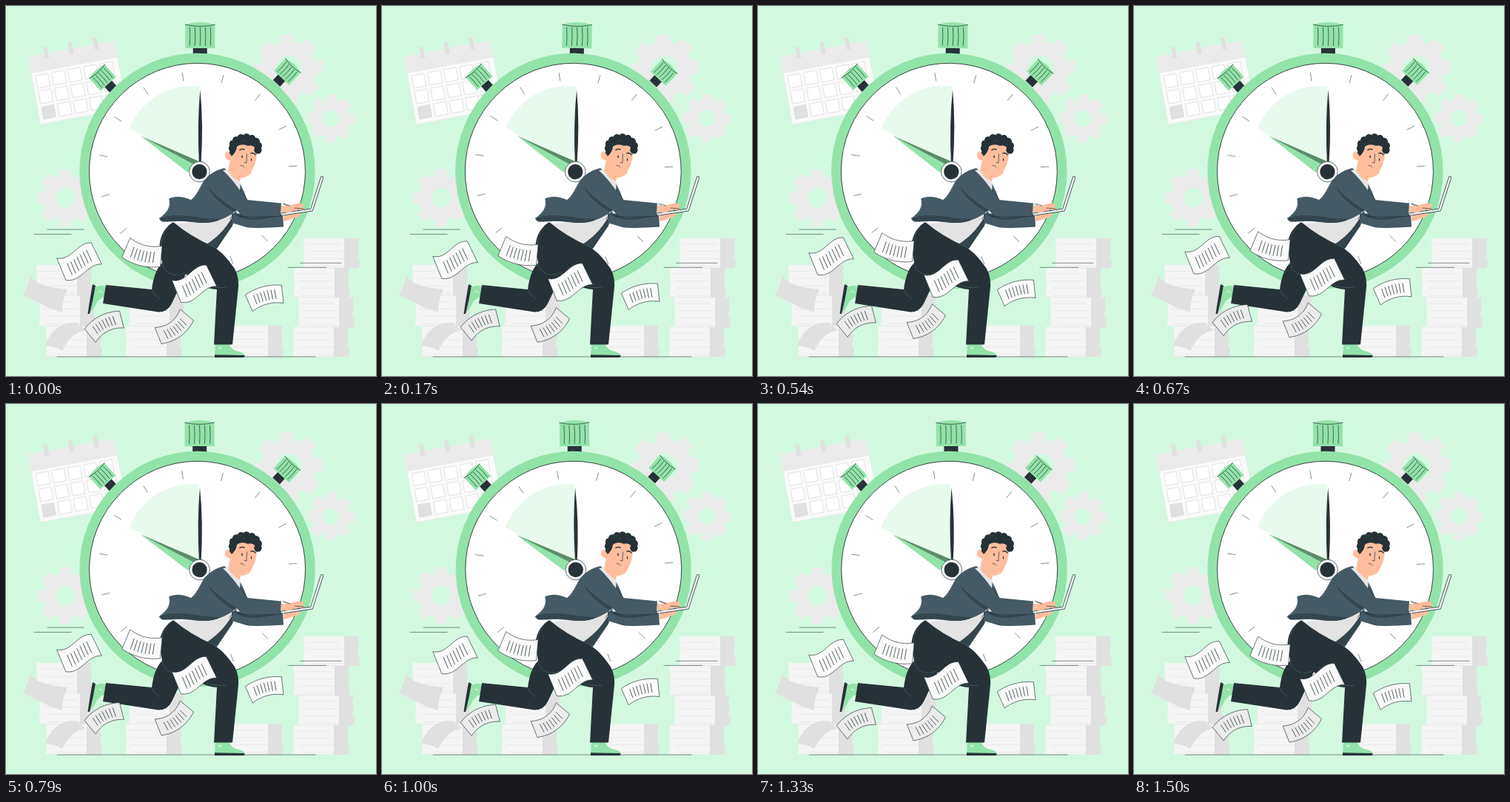
An HTML page for the animation above (1540 ms loop, 500x500 px).

```html
<!DOCTYPE html>
<html lang="en">
<head>
<meta charset="utf-8">
<title>Running against the clock</title>
<style>
html, body { margin: 0; height: 100%; overflow: hidden; background: #d2f9e0; }
svg { display: block; width: 100vw; height: 100vh; }
.ink { fill: #263238; }
.green { fill: #92e3a9; }
.suit { fill: #455a64; }
.fold { fill: #34454e; }
.skin { fill: #ffbe9d; }
.line { fill: none; stroke: #263238; stroke-width: .7; stroke-linecap: round; stroke-linejoin: round; }
.thin { stroke-width: .55; }
.seam { fill: none; stroke: #53656e; stroke-width: .6; }
.sheet { stroke: #263238; stroke-width: .6; stroke-linejoin: round; }
.laptop { fill: none; stroke-linecap: round; stroke-linejoin: round; }
</style>
</head>
<body>
<svg viewBox="0 0 500 500">
  <g id="calendar" transform="translate(29.6 68.6) rotate(-10.5)"></g>
  <g id="gears" fill="#ebebeb" fill-rule="evenodd"></g>
  <g id="stacks"></g>
  <path fill="#e0e0e0" d="M33 365C44 379 64 381 83 383Q76 396 76 414C58 409 44 400 23 391Q29 379 33 365Z
    M53 459C57 444 73 426 95 428L108 438C92 441 83 452 76 466Q66 459 53 459Z"/>

  <g id="watch">
    <g id="buttons"></g>
    <circle class="green" cx="258.5" cy="223" r="159.2"/>
    <circle cx="258.5" cy="223.3" r="146" fill="#fff" stroke="#263238" stroke-width=".9"/>
    <g id="ticks" class="line thin"></g>
    <path fill="#e8f9ed" d="M261 224L166.700 165C183 129 217 105 261 108Z"/>
    <path class="green" d="M182 176L256 214L246 225Z"/>
    <path fill="#5b8d6b" d="M182 176L261 210L256 215Z"/>
    <path class="ink" d="M262.2 113Q267 160 263.5 213H261Q258 160 262.2 113Z"/>
    <circle cx="261.5" cy="224" r="13.8" fill="#fff" stroke="#263238" stroke-width=".7"/>
    <circle class="ink" cx="261.5" cy="224" r="10.2"/>
  </g>

  <path class="line thin" d="M69 474H418M56 302H105M38 308.4H88M398 347.3H453M381 353.3H433"/>

  <g id="man">
    <path class="green" d="M121 380Q127 376 135 379L134 392Q124 396 120 406L113 415Z
      M283 457H302Q304 465 315 467Q322 469 323 473H282Z"/>
    <path class="ink" d="M117 376L121 378Q118 396 113 416H110.5Q113 398 117 376ZM282 471.2L322 472Q324 475 319 475H282Z"/>
    <path class="line" style="stroke:#fff" d="M127 385l2 2m0-2l-2 2M288 461l3 2m0-2l-3 2"/>
    <path fill="#e3e3e3" d="M226 294L270 292L311 278L298 302L272 323L245 308Z"/>
    <path class="ink" d="M226 292C214 299 206 314 208 329L211 347Q200 358 197 383L135 377L131 402L206 413.5Q218 414 224 402L243 362Q264 382 285 383L281 457.5H306L313.500 385Q316 368 309 355C302 345 293 333 280 325Q250 312 226 292Z"/>
    <path class="seam" d="M219 300Q208 310 210 332M211 347C213 361 228 368 242 360M197 383Q199 391 209 396M271 377Q284 382 298 380"/>
    <path class="fold" d="M312 277L306 297L285 328L271 322Q296 306 309 279Z"/>
    <path class="suit" d="M305 280L374 282L375 298.500Q338 301 325 299L305 293Z"/>
    <path class="fold" d="M308 281L372 284L340 289Q320 290 308 281Z"/>
    <path class="suit" d="M295 219C281 222 269 231 264 242Q256 258 250 262C240 257 228 256 220 260.500C224 273 215 281 207 287Q208 292 216 291C235 288 252 294 274 293Q295 290 312 276Q319 285 330 286L371 284L372 266.500L326 262Q318 239 308 229Z"/>
    <path class="fold" d="M208 287C233 277 256 288 290 288Q277 295 256 292C237 288 220 293 210 291ZM273 245Q282 263 307 278L312 276Q286 260 273 245Z"/>
    <path class="line" d="M298 224C309 235 317 250 326 262M312 277L302 288M314 284Q334 286 371 284"/>
    <path fill="#e6e6e6" d="M299 221L309 229L317 237L316 249Q305 233 293 222Z"/>
    <path class="skin" d="M302 197C295 195 293 205 300 208L303 209L300 222Q306 233 316 237L317 232Q329 233 333 221Q340 209 339 190L312 184Z"/>
    <g id="hair" class="ink"></g>
    <path class="ink" d="M303 182H340L342 199Q336 186 327 189Q318 185 312 190Q311 198 305 203L302 199Z"/>
    <path class="line" style="stroke-width:1.4" d="M316 194.500Q318 192.500 322 194M331 199Q335 198 337 201M319 203v1M331.5 207.500v1"/>
    <path class="line" d="M325.5 200L325 212L322 211.500M317 215.500Q320 214.500 322 218M319 202v3M331.5 206v3"/>
    <path class="skin" d="M372 270Q382 271 388 268Q398 265 402 268Q405 271 398 273L390 277L372 279ZM375 284Q384 280 395 279L399 282Q391 288 375 291Z"/>
    <g class="laptop">
      <path id="laptop" stroke="#263238" stroke-width="4.1" d="M373 281.500L413 275.500L427 232"/>
      <path stroke="#e9eeec" stroke-width="2.7" d="M373 281.500L413 275.500L427 232"/>
    </g>
    <path class="skin" d="M373 271L386 269L396 272L403 273L402 275.500L390 275L385 279L373 279Z"/>
    <path class="line" d="M375 267L384 270M390 273L402 274"/>
  </g>
  <g id="papers"></g>
</svg>

<script>
const PERIOD = 1540, LEAD = 40, GROUND = 474;
const byId = id => document.getElementById(id);
const add = (id, markup) => byId(id).innerHTML += markup;
const rect = (x, y, w, h, fill, extra = '') =>
  `<rect x="${x}" y="${y}" width="${w}" height="${h}" fill="${fill}" ${extra}/>`;
const polar = (r, deg) => {
  const a = deg * Math.PI / 180;
  return [r * Math.sin(a), -r * Math.cos(a)];
};

function drawCalendar() {
  let out = rect(0, 0, 119, 93, '#fafafa', 'stroke="#e6e6e6" stroke-width=".6"') +
    rect(0, 0, 119, 23, '#ebebeb');
  for (let i = 0; i < 3; i++) out += rect(22.5 + i * 34, -9, 5.5, 16, '#e0e0e0');
  for (let row = 0; row < 3; row++)
    for (let col = 0; col < 5; col++)
      out += rect(5.5 + col * 22, 27 + row * 21.5, 17, 17,
        row === 2 && !col ? '#e0e0e0' : '#fff', 'stroke="#e0e0e0" stroke-width=".9"');
  add('calendar', out);
}

function gear(cx, cy, r, hole, turn) {
  const points = [];
  for (let a = turn; a < turn + 360; a += 45)
    points.push(polar(r * .78, a - 15), polar(r, a - 10), polar(r, a + 10), polar(r * .78, a + 15));
  const half = x => `A${hole} ${hole} 0 0 0 ${x} 0`;
  add('gears', `<path transform="translate(${cx} ${cy})" stroke="#ebebeb" stroke-width="2" stroke-linejoin="round"
    d="M${points.join('L')}ZM${hole} 0${half(-hole)}${half(hole)}Z"/>`);
}

// A pile of paper blocks; the left edges are listed from the ground up.
function pile(top, ...edges) {
  const h = (GROUND - top) / edges.length;
  edges.forEach((x, i) => {
    const y = GROUND - h * (i + 1), side = x + 55, right = side + 20;
    let lines = `M${x} ${y + h - .4}H${right}`;
    for (let k = .2; k < 1; k += .24)
      lines += `M${x + 2 + k * 9} ${y + h * k}h46M${side + 3} ${y + h * k + 2}h14`;
    add('stacks', `<path fill="#e0e0e0" d="M${side - 2} ${y}H${right}l-2 ${h / 4}l2 3l-2 ${h * .3}l3 4L${right} ${y + h}H${side - 2}Z"/>
      <path fill="#f5f5f5" d="M${x} ${y}H${side}v${h}H${x}l1 ${-h / 2}Z"/>
      <path d="${lines}" stroke="#e0e0e0" stroke-width=".6"/>`);
  });
}

function button(x, y, angle, w, h, neck) {
  const left = -w / 2, top = -h / 2, bow = h * .09;
  let lines = '';
  for (let i = -2; i <= 2; i++)
    lines += `M${i * w / 5.7} ${top + h * .2}q1 ${h * .35} 0 ${h * .7}`;
  add('buttons', `<g transform="translate(${x} ${y}) rotate(${angle})">
    ${rect(-neck / 2, h / 2 - 1, neck, 11, '#263238')}
    <path class="green" d="M${left} ${top + bow}Q0 ${top - bow} ${-left} ${top + bow}V${h / 2}H${left}Z"/>
    <path class="line" d="M${left} ${top + bow}Q0 ${top + 2.5 * bow} ${-left} ${top + bow}${lines}"/></g>`);
}

// A sheet whose long edges follow a cubic with the given bends, flaring along its normals.
function paper(cx, cy, w, h, turn, bend1, bend2, fill) {
  const flare = (bend1 + bend2) / 150;
  const at = (u, v) => [
    w * (u - .5) * (1 + flare * (2 * v - 1)),
    h * (v - .5) + 3 * u * (1 - u) * ((1 - u) * bend1 + u * bend2)
  ];
  const outline = [];
  for (let i = 0; i <= 12; i++) {
    outline.push(at(i / 12, 0));
    outline.unshift(at(i / 12, 1));
  }
  let lines = '';
  for (let u = .2; u < .85; u += .1) lines += `M${at(u, .27)}L${at(u, .78)}`;
  add('papers', `<g transform="translate(${cx} ${cy}) rotate(${turn})">
    <path class="sheet" fill="${fill}" d="M${outline.join('L')}Z"/><path class="line" d="${lines}"/></g>`);
}

drawCalendar();
gear(382, 85, 46.5, 19, -4);
gear(439, 152, 32, 12, 2);
gear(80, 259, 38, 14, 0);

pile(350, 54, 45, 41);
pile(391, 162, 166);
pile(432, 299);
pile(314, 388, 395, 389, 402);

button(262, 39.5, 0, 40, 35, 19);
button(129.7, 96.2, -42, 28, 25, 13);
button(380.7, 87.8, 43, 28, 25, 13);

for (let a = 15; a < 375; a += 24) {
  const [x, y] = polar(123.5, a), [dx, dy] = polar(10.5, a);
  add('ticks', `<path d="M${259 + x} ${223 + y}l${dx} ${dy}"/>`);
}

for (let a = -95; a <= 105; a += 25) {
  const [x, y] = polar(1, a);
  add('hair', `<circle cx="${323.5 + 17.5 * x}" cy="${191 + 13.5 * y}" r="5.2"/>`);
}

paper(98.5, 345.5, 52, 32, -24, 12, -9, '#fafafa');
paper(254, 375.5, 52, 32, -24, 12, -9, '#fafafa');
paper(186, 333, 49, 28, 14, 6.5, 6.5, '#fafafa');
paper(135, 435, 48, 23, -27, -8, -8, '#ebebeb');
paper(225, 432, 48, 23, -36, 9, 9, '#ebebeb');
paper(351, 396, 47, 24, -15, -6, -6, '#fafafa');

function frame() {
  const p = (performance.now() + LEAD) % PERIOD / PERIOD;
  const triangle = x => 1 - 4 * Math.abs(x - Math.floor(x) - .5);
  const tilt = triangle(p + .25);
  const lift = 5 + 5 * triangle(p);
  byId('watch').setAttribute('transform', `rotate(${tilt} 258.5 202)`);
  byId('papers').setAttribute('transform', `translate(0 ${-lift})`);
  requestAnimationFrame(frame);
}
frame();
</script>
</body>
</html>
```
